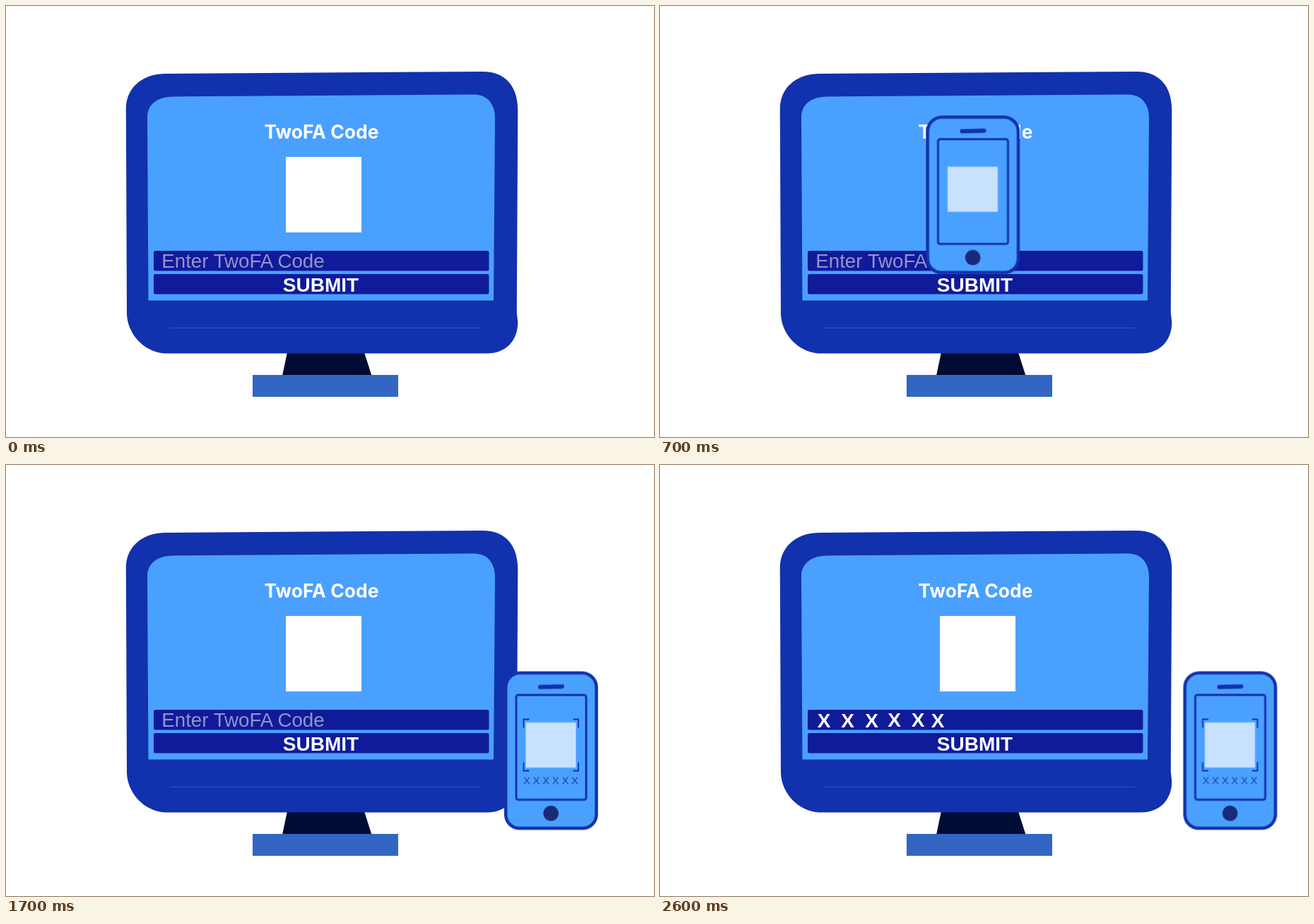
Animation of 917 by 611 pixels, one loop 2800 ms. Source, as an HTML page:

```html
<!DOCTYPE html>
<html lang="en">
<head>
<meta charset="utf-8">
<title>TwoFA Code</title>
<style>
  html, body { margin: 0; width: 100%; height: 100%; overflow: hidden; background: #fff; }
  svg { display: block; width: 100vw; height: 100vh; }
  svg { --navy: #1231ad; --sky: #4aa0ff; --field: #101b9a; }
  text { font-family: "Liberation Sans", Arial, sans-serif; font-size: 28px; }
  .navy { fill: var(--navy); }
  .sky { fill: var(--sky); }
  .field { fill: var(--field); }
  .line { fill: none; stroke: var(--navy); }
  .bold { font-weight: 700; fill: #fff; text-anchor: middle; }
  .title { font: 700 26.5px Inter, sans-serif; fill: #fff; text-anchor: middle; }
  .hint { font-size: 27.7px; fill: #9495cb; }
  .digits { font-size: 15px; fill: #1a3fa8; text-anchor: middle; }

  .phone, .glass, .scan, .frame, .cover, .hint, .mask {
    animation: 2800ms step-end infinite;
  }
  .phone { animation-name: move; }
  .glass { animation-name: solid; }
  .scan { animation-name: scan; }
  .frame { animation-name: frame; }
  .cover { animation-name: reveal; transform-origin: 106.8px 0; }
  .hint { animation-name: clear; }
  .mask { animation-name: type; }

  @keyframes move {
    0%      { transform: translate(595px, 260px); visibility: hidden; }
    3.571%  { transform: translate(595px, 260px); visibility: visible; }
    7.143%  { transform: translate(534px, 208px); }
    10.714% { transform: translate(457px, 181px); }
    14.286% { transform: translate(379.5px, 155.3px); }
    17.857% { transform: translate(378.5px, 155.3px); }
    21.429% { transform: translate(377.5px, 155.3px); }
    25%     { transform: translate(376.5px, 155.3px); }
    46.429% { transform: translate(459px, 183px); }
    53.571% { transform: translate(534.2px, 234.5px); }
    60.714% { transform: translate(705px, 292.5px); }
    67.857%, 100% { transform: translate(740.5px, 292.4px); visibility: visible; }
  }
  @keyframes solid { 0% { fill-opacity: .32; } 25%, 100% { fill-opacity: 1; } }
  @keyframes scan { 0% { opacity: 0; } 25%, 100% { opacity: 1; } }
  @keyframes frame { 0% { opacity: 0; } 28.571%, 100% { opacity: 1; } }
  @keyframes clear { 0% { opacity: 1; } 75%, 100% { opacity: 0; } }
  @keyframes reveal {
    0%      { transform: scaleX(1); }
    32.143% { transform: scaleX(.6667); }
    35.714% { transform: scaleX(.3333); }
    39.286%, 100% { transform: scaleX(0); }
  }
  @keyframes type {
    0%  { transform: translateX(0); }
    75% { transform: translateX(33px); animation-timing-function: steps(5, end); }
    92.857%, 100% { transform: translateX(198px); }
  }
</style>
</head>
<body>
<svg viewBox="0 0 917 611" preserveAspectRatio="none">
  <!-- monitor -->
  <path fill="#000c33" d="M398 491H507L517.5 524H391Z"/>
  <path fill="#3366c2" d="M349 523H555V554H349Z"/>
  <path class="navy" d="M224 96L672 93C708 92 724.3 115 724.3 148L722.8 435L724.3 448C724.3 475 707 492.5 681 492.5H224C194 490 172 464 171 437L169.8 146C169.8 118 190 97 224 96Z"/>
  <path class="sky" d="M236 128.5L661 125.5C682 125 692 140 692 158L690 417.5H201.5L200 158C200 140 213 129 236 128.5Z"/>
  <path d="M232 456.3H672" stroke="#2c5cc8"/>

  <text class="title" x="446.5" y="187.7">TwoFA Code</text>
  <rect x="396" y="214" width="107" height="107" fill="#fff"/>

  <!-- form -->
  <rect class="field" x="209" y="347" width="474.5" height="28.5" rx="2.5"/>
  <rect class="field" x="209" y="380" width="474.5" height="28.5" rx="2.5"/>
  <text class="bold" x="232 265.5 299.5 331.5 365 393" y="371.5 371.5 371.5 371 371 371.5">XXXXXX</text>
  <rect class="field mask" x="216" y="349" width="198" height="25"/>
  <text class="hint" x="220.3" y="371.4">Enter TwoFA Code</text>
  <text class="bold" x="445.5" y="404.8">SUBMIT</text>

  <!-- phone -->
  <g class="phone">
    <path class="sky" fill-rule="evenodd" d="M22.700 2.2H110a20.500 20.500 0 0 1 20.500 20.500V203a19.5 19.5 0 0 1-19.5 19.5H21.7A19.5 19.5 0 0 1 2.2 203V22.7A20.500 20.500 0 0 1 22.700 2.2ZM17 33.5V182H116V33.5Z"/>
    <rect class="sky glass" x="17" y="33.5" width="99" height="148.5"/>
    <path class="line" stroke-width="4.5" d="M22.700 2.2H110a20.500 20.500 0 0 1 20.500 20.500V203a19.5 19.5 0 0 1-19.5 19.5H21.7A19.5 19.5 0 0 1 2.2 203V22.7A20.500 20.500 0 0 1 22.700 2.2Z"/>
    <rect class="line" stroke-width="3" x="17" y="33.5" width="99" height="148.5" rx="3"/>
    <path class="line" stroke-width="6" stroke-linecap="round" d="M51 22.2L82 21.4"/>
    <circle cx="66.2" cy="201.3" r="10.8" fill="#1a2a78"/>
    <g class="scan">
      <rect x="30.5" y="72.5" width="71" height="64" fill="#c8e1ff"/>
      <path class="line frame" stroke-width="1.8" d="M27.5 80V68H35.5M97.5 68H105V80M27.5 129V141H35.5M97.5 141H105V129"/>
      <text class="digits" x="32 45.6 59.2 72.8 86.4 100" y="159.8">XXXXXX</text>
      <rect class="sky cover" x="25.2" y="147" width="81.6" height="16"/>
    </g>
  </g>
</svg>
</body>
</html>
```
